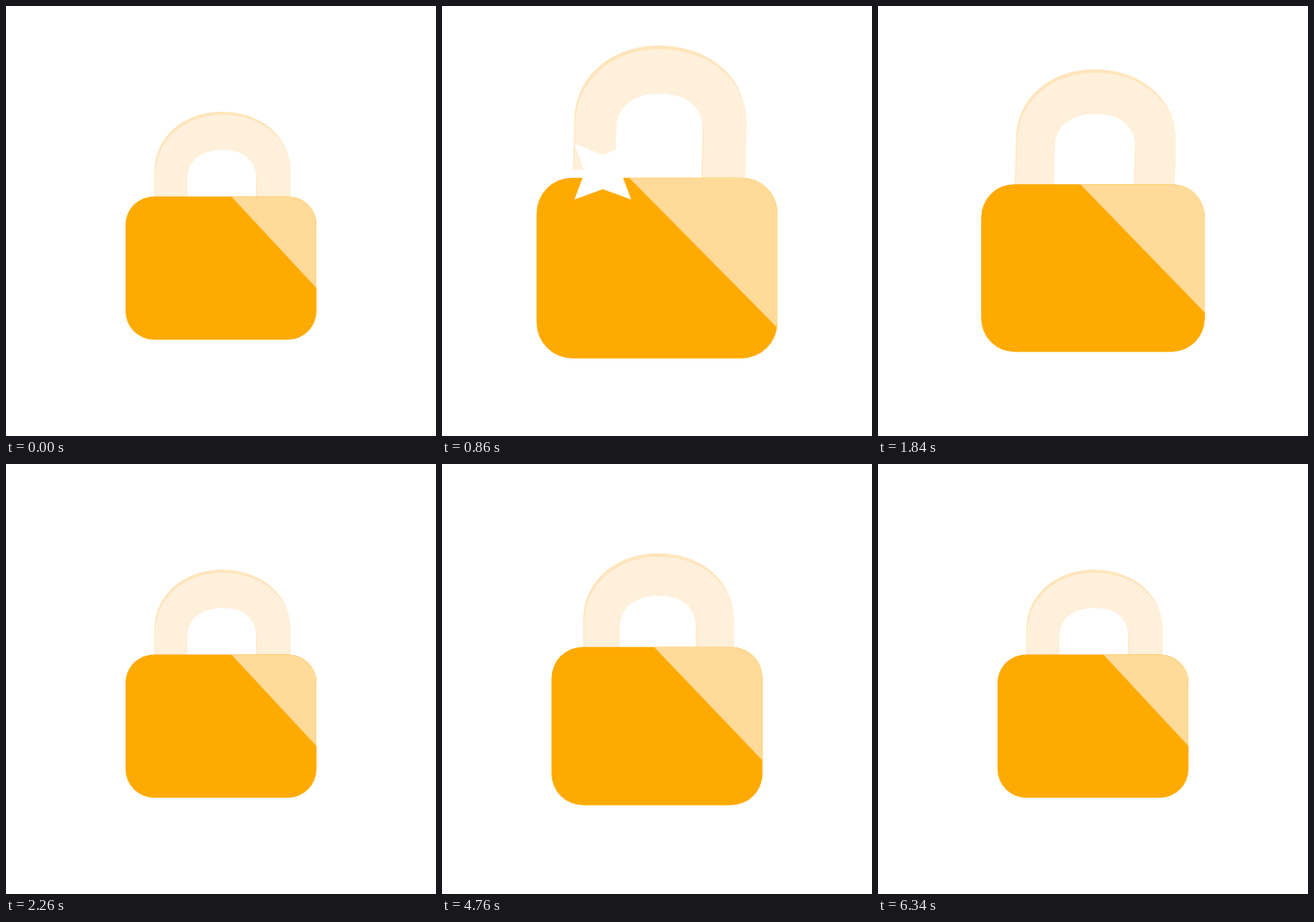
An HTML page for the animation above (8 s loop, 500x500 px).

```html
<!DOCTYPE html>
<html lang="en">
<head>
<meta charset="utf-8">
<title>Padlock</title>
<style>
  html, body { margin: 0; width: 100%; height: 100%; overflow: hidden; background: #fff; }
  svg { display: block; width: 100%; height: 100%; }
</style>
</head>
<body>
<svg viewBox="0 0 500 500">
  <defs>
    <path id="bow" d="M-77.5 -65 V-111 C-77.5 -153 -43 -181.5 1 -181.5 C47 -181.5 81 -153 81 -111
      V-30 H41 V-105 C41 -126 25 -137.5 2 -137.5 C-21 -137.5 -39 -126 -39 -105 V-65 Z"/>
    <rect id="box" x="-111" y="-83.2" width="222" height="166.5" rx="33"/>
    <clipPath id="bowClip"><use href="#bow"/></clipPath>
    <clipPath id="boxClip"><use href="#box"/></clipPath>
  </defs>
  <g id="lock">
    <g id="shackle">
      <use href="#bow" fill="#ffe5bc"/>
      <g clip-path="url(#bowClip)"><use href="#bow" x="1" y="3.5" fill="#fff0db"/></g>
    </g>
    <use href="#box" fill="#ffaa00"/>
    <g clip-path="url(#boxClip)"><path id="shine" fill="#ffda98"/></g>
  </g>
  <path id="star" fill="#fff" d="M-33 32 L0 20 L33 32 L21 0 L33 -33 L0 -20 L-33 -33 L-21 0 Z"/>
</svg>
<script>
  const LOOP = 8000;
  const $ = id => document.getElementById(id);
  const lock = $('lock'), shackle = $('shackle'), shine = $('shine'), star = $('star');

  // Uneven playback cadence: steps last 20, 20 and 100 ms.
  function beats(t) {
    const k = Math.floor(t / 140), r = t - k * 140;
    return 3 * k + (r >= 20) + (r >= 40);
  }

  // cubic-bezier(.25, .1, .25, 1)
  function ease(x) {
    if (x <= 0) return 0;
    if (x >= 1) return 1;
    const curve = (a, b, u) => 3 * a * u * (1 - u) ** 2 + 3 * b * u * u * (1 - u) + u ** 3;
    let lo = 0, hi = 1;
    for (let i = 0; i < 24; i++) {
      const m = (lo + hi) / 2;
      if (curve(.25, .25, m) < x) lo = m; else hi = m;
    }
    return curve(.1, 1, lo);
  }

  // Eased rise and its mirror image back down.
  function pulse(i, start, end) {
    const half = (end - start) / 2;
    return ease(1 - Math.abs(i - start - half) / half);
  }

  // Linear interpolation through [step, value] points.
  function track(i, points) {
    if (i <= points[0][0]) return points[0][1];
    for (let n = 1; n < points.length; n++) {
      const [a, va] = points[n - 1], [b, vb] = points[n];
      if (i <= b) return va + (vb - va) * (i - a) / (b - a);
    }
    return points[points.length - 1][1];
  }

  const LIFT = [[7, 0], [25, 30.3], [35, 26], [48, 0]];
  const TILT = [[16, 0], [25, 3.6], [30, 3.2], [35, 3], [48, 0]];
  const POP = [[15, 0], [19, 1], [21, 1], [25, 0]];

  function draw(t) {
    let grow = 0, lift = 0, tilt = 0, pop = 0;
    if (t < 2260) {
      const i = beats(t + 20);
      grow = .27 * pulse(i, 1, 50);
      lift = track(i, LIFT);
      tilt = track(i, TILT);
      pop = track(i, POP);
    } else if (t >= 4180 && t < 6340) {
      grow = .12 * pulse(beats(t - 4200) + 1, -1.5, 48);
    }
    lock.setAttribute('transform', `translate(250 304.6) scale(${1 + grow})`);
    shackle.setAttribute('transform', `rotate(${tilt} 61 -83) translate(0 ${-lift})`);
    const x = 12 - 144 * grow, y = 23.5 + 121.5 * grow;
    shine.setAttribute('d', `M${x} -83.2 L111 ${y} H120 V-90 H${x} Z`);
    star.setAttribute('transform', `translate(187 193) scale(${pop})`);
    star.setAttribute('visibility', pop > 0 ? 'visible' : 'hidden');
  }

  const begin = performance.now();
  function tick() {
    draw((performance.now() - begin) % LOOP);
    requestAnimationFrame(tick);
  }
  draw(0);
  requestAnimationFrame(tick);
</script>
</body>
</html>
```
